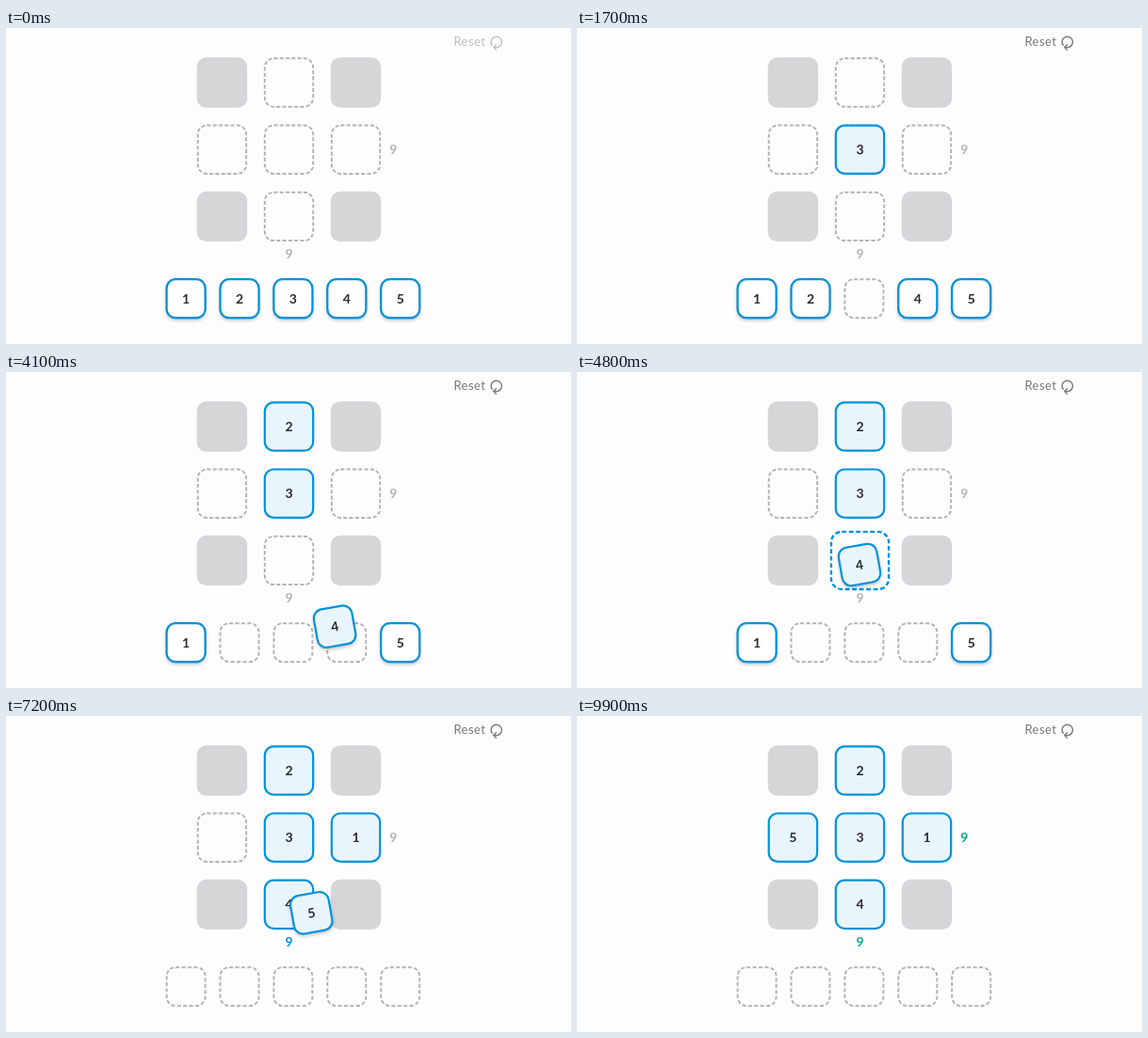
Recreate the animation shown at these times as an HTML page. Size 600x336 px, loop 10 s.

```html
<!DOCTYPE html>
<html lang="en">
<head>
<meta charset="utf-8">
<title>Number cross puzzle</title>
<style>
  html, body { margin: 0; width: 100%; height: 100%; overflow: hidden; background: #fefdfe; }
  svg { display: block; width: 600px; height: 336px; }
  text { font-family: Lato, "Open Sans", sans-serif; }
  .digit { font-size: 14px; font-weight: 700; text-anchor: middle; }
</style>
</head>
<body>
<svg id="stage" viewBox="0 0 600 336">
  <defs>
    <filter id="blur" x="-30%" y="-30%" width="160%" height="160%"><feGaussianBlur stdDeviation="2.2"/></filter>
  </defs>
  <g id="reset">
    <text x="475.5" y="19.3" font-size="13" letter-spacing=".4">Reset</text>
    <g fill="none" stroke-width="1.4">
      <path d="M516.6 18.8A5.7 5.7 0 1 1 521 20.6H518.2"/>
      <path d="M520.8 17.6L517.8 20.6L520.8 23.6"/>
    </g>
  </g>
</svg>
<script>
const LOOP = 10000;
const BLUE = [0, 146, 217], GREEN = [0, 169, 138], GRAY = [180, 179, 184];
const COLS = [229.4, 300.5, 371.5], ROWS = [58, 129.2, 200.4];
const TRAY_Y = 287.7, SMALL = 41, LARGE = 51.4, TILT = -10;

const stage = document.getElementById('stage');
const reset = document.getElementById('reset');

const clamp = v => Math.max(0, Math.min(1, v));
const span = (t, a, b) => clamp((t - a) / (b - a));
const smooth = p => p * p * (3 - 2 * p);
const easeOut = p => 1 - (1 - p) ** 3;
const mix = (a, b, p) => a + (b - a) * p;
const blend = (a, b, p) => `rgb(${a.map((v, i) => Math.round(mix(v, b[i], p)))})`;
const trayX = n => 191.1 + (n - 1) * 56.9;

function add(parent, tag, attrs = {}) {
  const el = document.createElementNS('http://www.w3.org/2000/svg', tag);
  set(el, attrs);
  parent.appendChild(el);
  return el;
}
function set(el, attrs) {
  for (const name in attrs) el.setAttribute(name, attrs[name]);
}
function sizeBox(el, size, dy = 0) {
  set(el, { x: -size / 2, y: -size / 2 + dy, width: size, height: size });
}
function dashedBox(size, dashes) {
  const r = 9.5, length = 4 * size - 8 * r + 2 * Math.PI * r, period = length / dashes;
  const el = add(stage, 'rect', {
    rx: r, fill: 'none', 'stroke-width': 2,
    'stroke-dasharray': `${period * 0.65} ${period * 0.35}`
  });
  sizeBox(el, size);
  return el;
}
function digit(parent, value, x, y, fill) {
  const el = add(parent, 'text', { class: 'digit', x, y, fill });
  el.textContent = value;
  return el;
}

// Board: gray corners, dashed slots elsewhere.
const cells = [];
ROWS.forEach((y, row) => COLS.forEach((x, col) => {
  const corner = row !== 1 && col !== 1;
  let el;
  if (corner) {
    el = add(stage, 'rect', { rx: 10, fill: '#d6d5d8' });
    sizeBox(el, 53.4);
  } else {
    el = dashedBox(LARGE, 30);
  }
  cells.push({ x, y, row, col, corner, el });
}));

for (let n = 1; n <= 5; n++) {
  set(dashedBox(SMALL, 23), { transform: `translate(${trayX(n)} ${TRAY_Y})`, stroke: blend(GRAY, GRAY, 0) });
}

const rowSum = digit(stage, 9, 411.3, 133.8);
const colSum = digit(stage, 9, 300.5, 245);

// Each move: tile number, board cell, pick-up time, path stops [time, x, y], drop start and end.
const moves = [
  { n: 3, cell: 4, lift: 450, stops: [[1035, 299, 131]], drop: 1300, end: 1800 },
  { n: 2, cell: 1, lift: 1950, stops: [[2600, 315, 57], [3000, 303, 60]], drop: 3000, end: 3700 },
  { n: 4, cell: 7, lift: 3850, stops: [[4710, 300, 205]], drop: 4850, end: 5400 },
  { n: 1, cell: 5, lift: 5550, stops: [[5950, 371, 129]], drop: 6100, end: 6600 },
  { n: 5, cell: 3, lift: 6950, stops: [[7450, 231, 132]], drop: 7500, end: 8000 }
];
for (const m of moves) {
  m.home = cells[m.cell];
  m.home.move = m;
  m.el = add(stage, 'g');
  m.shadow = add(m.el, 'rect', { rx: 9, fill: '#000', filter: 'url(#blur)' });
  m.box = add(m.el, 'rect', { rx: 9.5, 'stroke-width': 2.2, stroke: blend(BLUE, BLUE, 0) });
  digit(m.el, m.n, 0, 5, '#2b2b30');
}

function dragPoint(m, t) {
  let x = trayX(m.n), y = TRAY_Y, from = m.lift;
  for (const [to, px, py] of m.stops) {
    const p = smooth(span(t, from, to));
    x = mix(x, px, p);
    y = mix(y, py, p);
    from = to;
  }
  return [x, y];
}

// Celebration wave running diagonally from the top-left corner.
function pulse(cell, t) {
  const start = 8110 + 100 * (cell.row + cell.col);
  return 1 + 0.1 * Math.sin(Math.PI * span(t, start, start + 900)) ** 2;
}

function drawTile(m, t) {
  const lift = smooth(span(t, m.lift, m.lift + 120));
  const drop = easeOut(span(t, m.drop, m.end));
  const [dx, dy] = dragPoint(m, t);
  const x = mix(dx, m.home.x, drop), y = mix(dy, m.home.y, drop);
  const size = mix(SMALL, LARGE, drop);
  const angle = TILT * lift * (1 - drop);
  set(m.el, { transform: `translate(${x} ${y}) rotate(${angle}) scale(${pulse(m.home, t)})` });
  sizeBox(m.box, size);
  sizeBox(m.shadow, size, 2);
  set(m.shadow, { opacity: 0.32 * (1 - drop) });
  set(m.box, { fill: blend([255, 255, 255], [233, 245, 252], lift) });
}

function hover(cell, t) {
  const m = moves.find(m => t >= m.lift && t < m.end);
  if (!m || (cell.move !== m && t >= cell.move.drop)) return 0;
  const [x, y] = dragPoint(m, t);
  const distance = Math.max(Math.abs(x - cell.x), Math.abs(y - cell.y));
  return smooth(clamp((32 - distance) / 12)) * (1 - easeOut(span(t, m.drop, m.drop + 250)));
}

function drawCell(cell, t) {
  let scale = pulse(cell, t);
  if (!cell.corner) {
    const h = hover(cell, t);
    scale = 1 + 0.19 * h;
    set(cell.el, {
      stroke: blend(GRAY, BLUE, h),
      visibility: t >= cell.move.end ? 'hidden' : 'visible'
    });
  }
  set(cell.el, { transform: `translate(${cell.x} ${cell.y}) scale(${scale})` });
}

function render(t) {
  cells.forEach(cell => drawCell(cell, t));
  moves.forEach(m => drawTile(m, t));

  const solved = span(t, 8100, 8500);
  const colDone = span(t, 4950, 5300);
  set(rowSum, { fill: blend(GRAY, GREEN, solved) });
  set(colSum, { fill: t < 8100 ? blend(GRAY, BLUE, colDone) : blend(BLUE, GREEN, solved) });

  const ink = blend([192, 192, 195], [119, 119, 123], span(t, 450, 700));
  set(reset, { fill: ink, stroke: 'none' });
  set(reset.querySelector('g'), { stroke: ink });
}

// Lifted tile is always painted above the placed ones.
[...moves].forEach(m => stage.appendChild(m.el));

const began = performance.now();
function tick(now) {
  render(Math.max(0, now - began) % LOOP);
  requestAnimationFrame(tick);
}
render(0);
requestAnimationFrame(tick);
</script>
</body>
</html>
```
